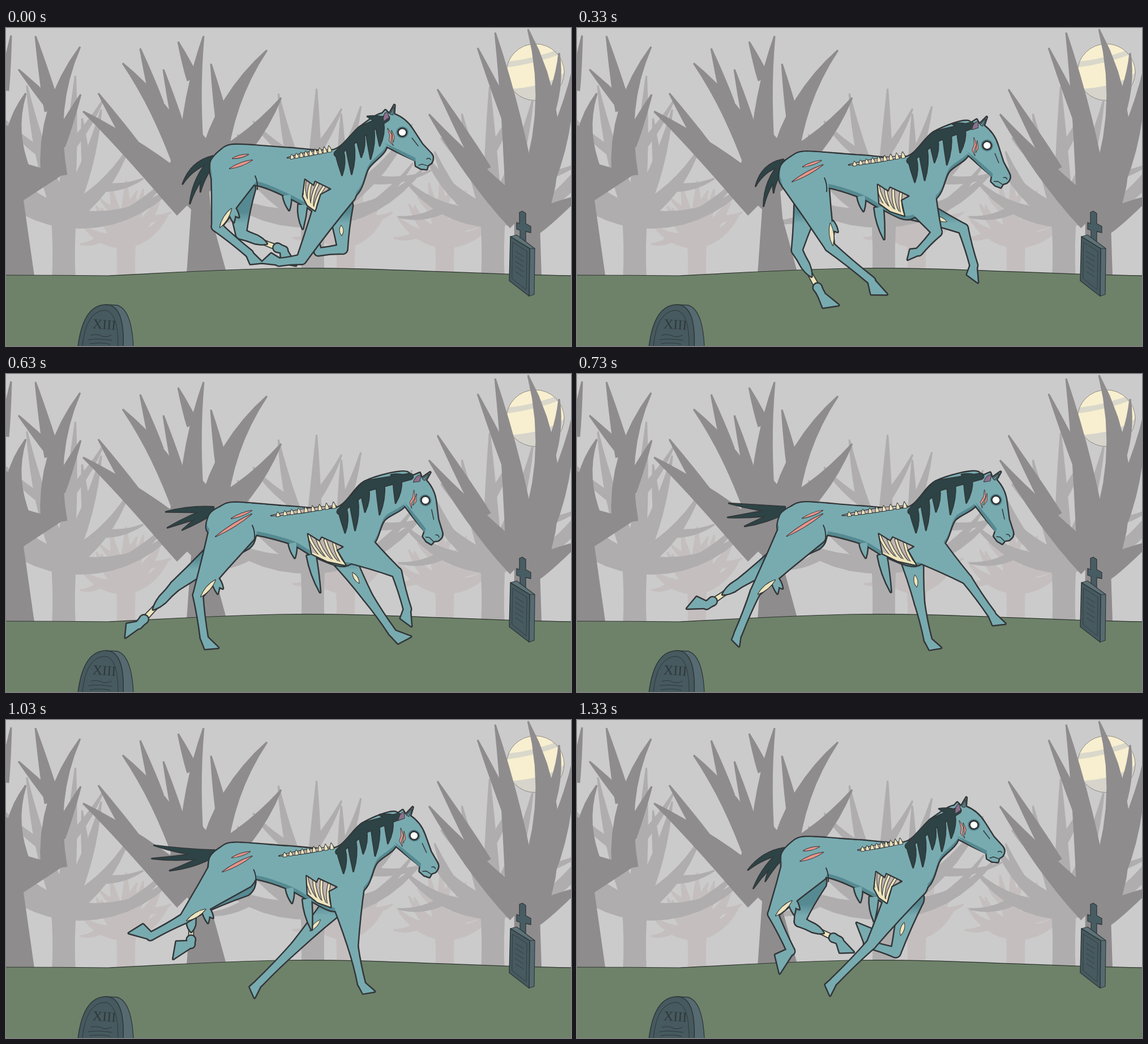
Recreate the animation shown at these times as an HTML page with a canvas. Size 998 by 561 pixels, loop 1430 ms.

```html
<!DOCTYPE html>
<html lang="en">
<head>
<meta charset="utf-8">
<title>Zombie horse</title>
<style>
html, body { margin: 0; width: 100%; height: 100%; overflow: hidden; background: #ccc; }
canvas { display: block; width: 100vw; height: 100vh; }
</style>
</head>
<body>
<canvas id="stage" width="998" height="561"></canvas>
<script>
const W = 998, H = 561, LOOP = 1430, STEPS = 15;
const SKIN = '#78abb0', SHADE = '#568a92', INK = '#333638', HAIR = '#2d4345';
const BONE = '#eee4bc', GAP = '#bfb4ae', FLESH = '#e8948a', STONE = '#30383a';
const ctx = document.getElementById('stage').getContext('2d');

// ---------- geometry ----------
const pairs = a => Array.from({ length: a.length / 2 }, (_, i) => [a[2 * i], a[2 * i + 1]]);
const lerp = (a, b, u) => a + (b - a) * u;
const mix = (a, b, u) => a.map((v, i) => lerp(v, b[i], u));
const add = (p, x, y) => [p[0] + x, p[1] + y];
const shift = (p, n, d) => add(p, n[0] * d, n[1] * d);
const unit = (a, b) => {
  const l = Math.hypot(b[0] - a[0], b[1] - a[1]) || 1;
  return [(b[0] - a[0]) / l, (b[1] - a[1]) / l];
};
const normal = (a, b) => { const [x, y] = unit(a, b); return [-y, x]; };

function poly(points) {
  const p = new Path2D();
  points.forEach(q => p.lineTo(...q));
  p.closePath();
  return p;
}

// closed smooth curve through the points
function blob(q) {
  const p = new Path2D(), n = q.length, at = i => q[(i + n) % n];
  p.moveTo(...q[0]);
  for (let i = 0; i < n; i++) {
    const a = at(i), b = at(i + 1), s = at(i - 1), e = at(i + 2);
    p.bezierCurveTo(a[0] + (b[0] - s[0]) / 7, a[1] + (b[1] - s[1]) / 7,
      b[0] - (e[0] - a[0]) / 7, b[1] - (e[1] - a[1]) / 7, ...b);
  }
  p.closePath();
  return p;
}

// tapered capsule, thinner in the middle when thin < 1
function limb(a, b, wa, wb, thin = .84) {
  const p = new Path2D(), n = normal(a, b), m = mix(a, b, .5), wm = (wa + wb) / 4 * thin;
  const ang = Math.atan2(b[1] - a[1], b[0] - a[0]), h = Math.PI / 2;
  p.moveTo(...shift(a, n, wa / 2));
  p.quadraticCurveTo(...shift(m, n, wm), ...shift(b, n, wb / 2));
  p.arc(...b, wb / 2, ang + h, ang - h, true);
  p.quadraticCurveTo(...shift(m, n, -wm), ...shift(a, n, -wa / 2));
  p.arc(...a, wa / 2, ang - h, ang + h, true);
  p.closePath();
  return p;
}

// pointed lock; bend pushes its middle sideways
function spike(a, tip, w, bend = 0) {
  const p = new Path2D(), n = normal(a, tip), c = shift(mix(a, tip, .5), n, bend);
  p.moveTo(...shift(a, n, w / 2));
  p.quadraticCurveTo(...shift(c, n, w / 2), ...tip);
  p.quadraticCurveTo(...shift(c, n, -w / 2), ...shift(a, n, -w / 2));
  p.closePath();
  return p;
}
function lens(a, b, w) {
  const p = new Path2D(), n = normal(a, b), m = mix(a, b, .5);
  p.moveTo(...a);
  p.quadraticCurveTo(...shift(m, n, w), ...b);
  p.quadraticCurveTo(...shift(m, n, -w), ...a);
  return p;
}
function hoof(ankle, toe) {
  const x = toe[0] - ankle[0], y = toe[1] - ankle[1];
  const heel = add(ankle, .42 * x - .5 * y, .5 * x + .42 * y);
  const d = unit(heel, toe);
  return poly([shift(ankle, d, 6), toe, heel, shift(ankle, d, -6)]);
}

// ---------- painting ----------
function outline(c, paths, width, ink = INK) {
  c.strokeStyle = ink;
  c.lineWidth = width;
  c.lineJoin = c.lineCap = 'round';
  paths.forEach(p => c.stroke(p));
}
function fill(c, paths, color) {
  c.fillStyle = color;
  paths.forEach(p => c.fill(p));
}
function paint(paths, color, width = 5) {
  outline(ctx, paths, width);
  fill(ctx, paths, color);
}
const line = (c, d, width = 1.5, ink = INK) => outline(c, [new Path2D(d)], width, ink);

// ---------- scenery ----------
function makeScene() {
  const cv = document.createElement('canvas');
  cv.width = W;
  cv.height = H;
  const c = cv.getContext('2d');
  const shape = (d, color, ink) => {
    const p = new Path2D(d);
    fill(c, [p], color);
    if (ink) outline(c, [p], ink, STONE);
  };

  let bark, seed = 11;
  const random = () => (seed = seed * 16807 % 2147483647) / 2147483647;

  // curved branch tapering to a point; returns its middle
  function branch(x0, y0, x1, y1, w, bend = 0) {
    const a = [x0, y0], b = [x1, y1], n = normal(a, b);
    const ctrl = shift(mix(a, b, .5), n, bend * Math.hypot(x1 - x0, y1 - y0));
    const at = u => mix(mix(a, ctrl, u), mix(ctrl, b, u), u);
    const left = [], right = [];
    for (let u = 0; u <= 1; u += .125) {
      const half = (w * (1 - u ** 1.3) + 3) / 2, m = normal(mix(a, ctrl, u), mix(ctrl, b, u));
      left.push(shift(at(u), m, half));
      right.unshift(shift(at(u), m, -half));
    }
    fill(c, [poly([...left, ...right])], bark);
    return at(.5);
  }

  // trunk with a fan of upturned branches, one twig on each
  function tree(x, crown, reach, w) {
    fill(c, [limb([x, 445], [x, crown], w, w * 1.1, .8)], bark);
    for (let i = 0; i < 7; i++) {
      const a = (i - 3) * .42 + random() * .2 - .1, r = reach * (.75 + random() * .35);
      const mid = branch(x, crown + 10, x + Math.sin(a) * r * .85, crown - Math.cos(a) * r, w * .75, a * .18);
      const b = a + (i % 2 ? .5 : -.5), t = r * .42;
      branch(...mid, mid[0] + Math.sin(b) * t, mid[1] - Math.cos(b) * t, w * .32, b * .1);
    }
  }

  c.fillStyle = '#cccbcc';
  c.fillRect(0, 0, W, H);

  const moon = new Path2D();
  moon.ellipse(935, 78, 51, 50, 0, 0, 7);
  c.save();
  fill(c, [moon], '#f7efcf');
  c.clip(moon);
  shape('M880 60Q935 55 990 32V42Q935 64 880 70Z', '#dad7cb');
  shape('M990 75Q960 105 880 108V132H990Z', '#d6d4cb');
  c.restore();
  outline(c, [moon], .8, '#77736a');

  bark = '#c4bfbe';
  [212, 600, 775].forEach(x => tree(x, 365, 105, 34));
  bark = '#afadae';
  [102, 542, 860].forEach(x => tree(x, 325, 235, 42));

  bark = '#8f8c8e';
  shape('M-2 437H50L31 304 103 257V185L66 180 66 248 38 240 20 180 -2 170Z', bark);
  branch(85, 262, 131, 33, 44, -.17);
  branch(82, 145, 52, 14, 26);
  branch(78, 135, 22, 73, 17);
  branch(92, 205, 132, 117, 24);
  branch(22, 255, 35, 115, 40, -.2);
  branch(-4, 110, 9, 13, 16);

  shape('M319 434L389 430 363 335 358 275 380 225 345 185 300 200 280 275 327 320Z', bark);
  branch(335, 270, 486, 123, 56, .12);
  branch(365, 240, 461, 39, 46, -.14);
  branch(382, 165, 362, 63, 20);
  branch(328, 235, 349, 14, 42, -.06);
  branch(330, 90, 304, 24, 19);
  branch(318, 235, 206, 62, 46, .08);
  branch(268, 135, 237, 36, 20);
  branch(305, 175, 278, 73, 18);
  branch(325, 308, 136, 147, 62, .04);
  branch(238, 228, 163, 115, 24);

  shape('M897 438H946L943 345 962 275 940 225 890 270 898 330Z', bark);
  branch(930, 310, 922, 2, 62, .18);
  branch(912, 320, 864, 8, 54, .03);
  branch(892, 170, 833, 35, 21);
  branch(908, 335, 747, 152, 48, -.04);
  branch(845, 252, 762, 108, 24);
  branch(950, 165, 977, 44, 23, .12);
  branch(935, 290, 1002, 70, 46, .1);
  branch(930, 345, 1015, 295, 40);

  const hill = 'M-2 436Q90 436 180 437C260 434 300 429 480 424C650 421 800 434 1000 437';
  shape(hill + 'V563H-2Z', '#6e826a');
  line(c, hill, 1.2, '#2e352f');

  shape('M176 488L196 489Q222 496 225 563H205Z', '#566b71', 1.3);
  shape('M127 563Q136 488 177 488Q210 489 207 563Z', '#465a5f', 1.6);
  line(c, 'M135 561Q141 500 174 498Q198 499 198 561', 1, STONE);
  c.save();
  c.translate(173, 531);
  c.rotate(.07);
  c.font = '24px "Liberation Serif", serif';
  c.textAlign = 'center';
  c.fillStyle = STONE;
  c.fillText('XIII', 0, 0);
  c.restore();
  line(c, 'M150 542Q160 539 168 543T186 542M146 550Q160 547 187 551M148 557Q170 554 184 558', 1, STONE);

  shape('M907 325L912 323 918 327V345L927 350V361L918 359V378L908 374V357L902 355V343L907 345Z', '#485d63', 1.3);
  shape('M891 368L902 365 934 389 925 390Z', '#5d7378', 1.2);
  shape('M925 389L934 389 933 470 924 473Z', '#566b71', 1.2);
  shape('M891 368L925 389 924 473 889 446Z', '#465a5f', 1.5);
  line(c, 'M895 378L920 394 919 462 894 442Z', .8, STONE);
  for (let y = 394; y < 432; y += 9) line(c, `M900 ${y}L914 ${y + 9}`, .8, STONE);
  return cv;
}

// ---------- gait ----------
// The trunk swings between two poses; head is eye x, eye y, tilt.
const gathered = {
  body: [361,240, 378,217, 405,206, 500,212, 580,215, 625,175, 668,152, 672,210,
    640,247, 622,290, 570,335, 530,315, 495,297, 443,277, 372,275],
  head: [700, 184, 40], hip: [403, 256], shoulder: [586, 286],
  ribs: [528,267, 573,284, 546,323, 524,297], spine: [497,229, 574,215],
  cuts: [400,230, 428,223, 395,248, 435,233]
};
const stretched = {
  body: [359,250, 378,235, 405,227, 500,234, 585,236, 634,190, 710,174, 706,230,
    668,258, 649,300, 600,338, 545,322, 505,300, 438,283, 360,280],
  head: [741, 223, 66], hip: [402, 270], shoulder: [613, 302],
  ribs: [533,282, 595,305, 601,338, 540,318], spine: [468,250, 583,233],
  cuts: [398,255, 434,241, 370,287, 434,247]
};
const tailDown = [318,282, 333,318, 350,292], tailUp = [256,215, 250,237, 283,263];
const PEAK = 7.3;
const swing = step => (1 + Math.cos((step - PEAK) / STEPS * 2 * Math.PI)) / 2;

// Closed joint paths; both legs of a pair share them, the far one running ahead.
const BEATS = [0, 2, 5, 7, 9, 11, 14];
const hind = [
  [372,350, 421,365, 441,393, 339,390, 305,376, 315,350, 346,342],
  [430,398, 497,394, 506,468, 350,465, 240,445, 255,382, 378,408],
  [453,414, 518,421, 536,490, 375,483, 217,467, 217,376, 358,447]
].map(pairs);
const fore = [
  [522,408, 571,406, 664,341, 690,350, 676,376, 613,400, 520,395],
  [482,413, 521,391, 645,400, 709,415, 735,435, 628,465, 455,460],
  [451,414, 502,354, 628,437, 716,445, 771,440, 651,479, 447,486]
].map(pairs);

// cyclic Hermite curve through a joint path
function along(path, step) {
  const n = BEATS.length, s = (step + STEPS) % STEPS;
  const time = i => BEATS[(i + n) % n] + Math.floor(i / n) * STEPS;
  const at = i => path[(i + n) % n];
  const k = BEATS.findLastIndex(b => b <= s), span = time(k + 1) - time(k), u = (s - time(k)) / span;
  const slope = (i, j) => (at(i + 1)[j] - at(i - 1)[j]) / (time(i + 1) - time(i - 1)) * span;
  return [0, 1].map(j => lerp(at(k)[j], at(k + 1)[j], u * u * (3 - 2 * u))
    + slope(k, j) * u * (1 - u) ** 2 - slope(k + 1, j) * u * u * (1 - u));
}
const joints = (paths, step, dx = 0, dy = 0) => paths.map(p => add(along(p, step), dx, dy));

// ---------- horse ----------
const headPath = new Path2D('M657 170L662 154 670 145 677 152 686 136 685 152Q706 160 718 179L735 205 750 221Q757 228 751 238L745 242 743 249 733 248 724 243 723 233Q700 223 683 214L667 206Z');
const farSkin = ctx.createLinearGradient(0, 325, 0, 345);
farSkin.addColorStop(0, SHADE);
farSkin.addColorStop(1, SKIN);

const leg = (top, [knee, ankle, toe], w, thin) =>
  [limb(top, knee, w, 16, thin), limb(knee, ankle, 16, 12, .72), hoof(ankle, toe)];

function drawFarLegs(step) {
  const [hock, ankle, toe] = joints(hind, step + 2, -6, -2);
  const torn = mix(hock, ankle, .35), sock = mix(hock, ankle, .85);
  paint([limb(torn, sock, 8, 8, .7)], BONE, 3.5);
  paint([limb([412, 285], hock, 56, 17), limb(hock, torn, 17, 14),
    spike(torn, mix(hock, ankle, .6), 13),
    limb(sock, ankle, 14, 12), hoof(ankle, toe)], farSkin);

  const top = [590, 315], front = joints(fore, step + 3, -8, 4);
  paint(leg(top, front, 44), farSkin);
  paint([lens(mix(top, front[0], .45), mix(top, front[0], .68), 6)], BONE, 2);
}

function drawRibs([tl, tr, br, bl]) {
  const patch = poly([tl, add(mix(tl, tr, .3), 2, 6), add(mix(tl, tr, .4), 0, -3), tr,
    mix(mix(tr, br, .4), tl, .2), br, add(mix(br, bl, .5), -3, 3), bl]);
  paint([patch], GAP, 3);
  ctx.save();
  ctx.clip(patch);
  for (let i = 0; i < 5; i++) {
    const u = i / 4, a = mix(tl, tr, u), b = mix(bl, br, .35 + u * .8), rib = new Path2D();
    rib.moveTo(...a);
    rib.quadraticCurveTo(...shift(mix(a, b, .55), normal(a, b), 6), ...b);
    outline(ctx, [rib], 6);
    outline(ctx, [rib], 3.8, BONE);
  }
  outline(ctx, [limb(bl, br, 1, 1)], 5, BONE);
  ctx.restore();
  outline(ctx, [patch], 1.6);
}

function drawSpine([a, b]) {
  const n = normal(a, b);
  paint([lens(a, b, 6)], GAP, 2.5);
  for (let i = 1; i < 10; i++) {
    const p = mix(a, b, i / 9.3);
    paint([spike(shift(p, n, 3), shift(p, n, -4 - i * .4), 6)], BONE, 2);
  }
}

function drawMane(body, u) {
  const [w, c, p] = body.slice(4, 7).map(q => add(q, 4, 7));
  const root = v => v < .5 ? mix(w, c, v * 2) : mix(c, p, v * 2 - 1);
  const locks = [limb(w, c, 8, 18, 1), limb(c, p, 18, 10, 1), spike(root(.92), add(p, -34, -3), 11)];
  for (let i = 0; i < 5; i++) {
    const r = root(.05 + i * .2);
    locks.push(spike(r, add(r, 5 - i * (1 + u), i % 2 ? 56 : 42), 15, -3));
  }
  paint(locks, HAIR, 3);
}

function drawFace(m) {
  ctx.save();
  ctx.setTransform(m);
  fill(ctx, [new Path2D('M668 203Q690 212 723 229L724 236Q700 224 683 214Z')], SHADE);
  paint([new Path2D('M667 164Q666 151 673 148L676 158Z')], '#8d6f8c', 2);
  paint([new Path2D('M679 152L685 140 683 153Z')], SHADE, 2);
  paint([new Path2D('M674 177L681 188 680 200 684 207 677 199 678 189Z'),
    new Path2D('M681 181L686 193 684 201 683 191Z')], FLESH, 1.6);
  const eye = r => { const p = new Path2D(); p.ellipse(700, 184, r, r * .95, 0, 0, 7); return p; };
  fill(ctx, [eye(11)], SHADE);
  fill(ctx, [eye(9.2)], INK);
  fill(ctx, [eye(6.2)], '#fff');
  line(ctx, 'M717 194L728 208M743 231Q747 228 750 232M744 243L735 240 729 242', 1.5);
  ctx.restore();
}

function drawHorse(step) {
  const u = swing(step), at = part => mix(gathered[part], stretched[part], u);
  const q = pairs(at('body')), [ex, ey, tilt] = at('head'), hip = at('hip');

  // the tail trails the body
  const dock = add(q[0], 8, -10), lift = swing(step - 2.5) ** 1.5;
  paint(pairs(mix(tailDown, tailUp, lift)).map((tip, i) => spike(dock, tip, 11, lerp(20 - i * 4, -8, lift))), HAIR, 3);
  drawFarLegs(step);

  const m = new DOMMatrix().translate(ex, ey).rotate(tilt - 40).translate(-700, -184);
  const head = new Path2D();
  head.addPath(headPath, m);

  // torn skin on belly and thigh
  const back = joints(hind, step), hock = back[0], up = unit(hock, hip), out = normal(hock, hip);
  const shin = shift(hock, out, 6), tear = shift(shift(hock, up, 38), out, 15);
  const belly = add(q[12], 1, -2), rib = add(q[11], -6, -3);
  const body = blob(q), rest = [head,
    spike(belly, add(belly, 4, 26), 13), spike(rib, add(rib, u * 16, 42 + u * 24), 15, 2),
    spike(tear, add(tear, 4, 24), 12), spike(tear, add(tear, 13, 15), 12),
    ...leg(hip, back, 84, .95), ...leg(at('shoulder'), joints(fore, step), 66, .9)];

  outline(ctx, [body, ...rest], 5);
  fill(ctx, [body], SHADE);
  ctx.save();
  ctx.clip(body);
  ctx.translate(1, -6);
  fill(ctx, [body], SKIN);
  ctx.restore();
  fill(ctx, rest, SKIN);

  const [fx, fy] = q[13];
  line(ctx, `M${fx - 3} ${fy - 16}Q${fx + 2} ${fy - 6} ${fx + 1} ${fy + 8}`, 2);
  paint([lens(shin, tear, 7)], BONE, 2.2);
  const cuts = pairs(at('cuts'));
  paint([lens(cuts[0], cuts[1], 4), lens(cuts[2], cuts[3], 5)], FLESH, 2);
  drawRibs(pairs(at('ribs')));
  drawSpine(pairs(at('spine')));
  drawMane(q, u);
  drawFace(m);
}

// ---------- loop ----------
const scene = makeScene();
let shown = -1;
function tick(now) {
  const t = now % LOOP;
  const step = t < 30 ? 0 : 1 + Math.floor((t - 30) / 100);
  if (step !== shown) {
    shown = step;
    ctx.drawImage(scene, 0, 0);
    drawHorse(step);
  }
  requestAnimationFrame(tick);
}
tick(performance.now());
</script>
</body>
</html>
```
